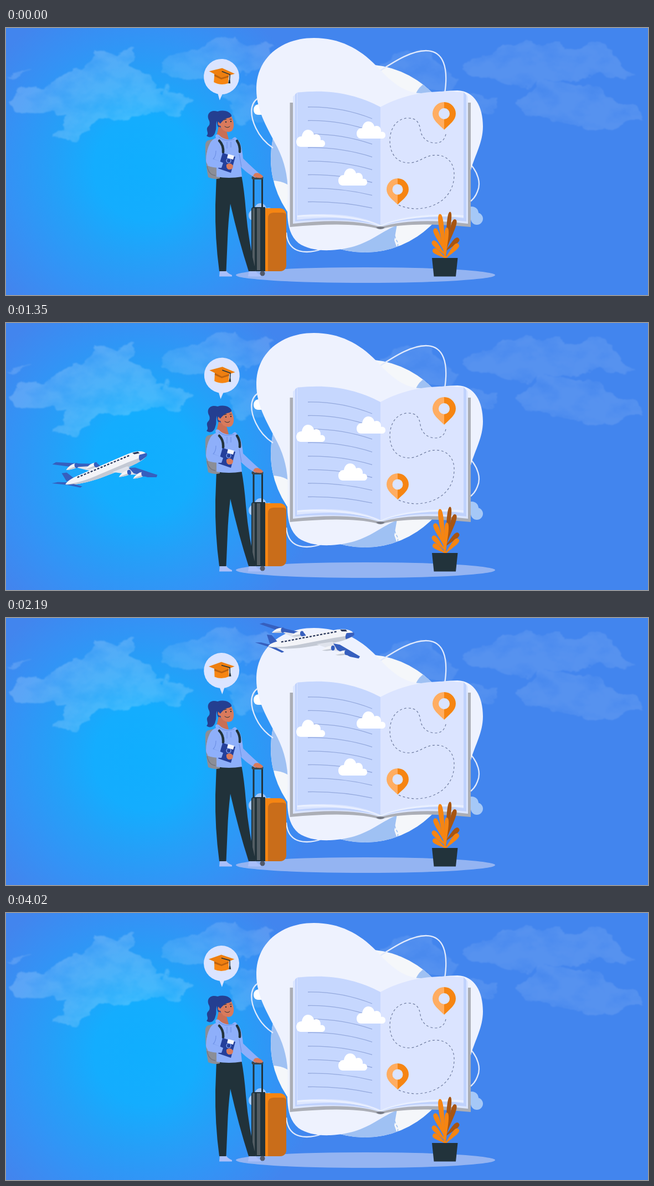
These frames come from a looping animation (1159 by 483 pixels, 4.35 s). An HTML page:

```html
<!DOCTYPE html>
<html lang="en">
<head>
<meta charset="utf-8">
<title>Study abroad</title>
<style>
html, body { margin: 0; width: 100%; height: 100%; overflow: hidden; background: #4285ee; }
svg { position: absolute; left: 0; top: 0; width: 1159px; height: 483px; }
#sky { will-change: transform; }
</style>
</head>
<body>
<svg id="sky" viewBox="0 0 1159 483">
  <defs>
    <radialGradient id="glow" gradientUnits="userSpaceOnUse" cx="252" cy="254" r="330">
      <stop offset="0" stop-color="#10aefe"/>
      <stop offset=".28" stop-color="#14adfe"/>
      <stop offset=".5" stop-color="#24a0f8"/>
      <stop offset=".75" stop-color="#3492f5"/>
      <stop offset="1" stop-color="#4285ee"/>
    </radialGradient>
    <filter id="wisp" filterUnits="userSpaceOnUse" x="0" y="0" width="1159" height="483" color-interpolation-filters="sRGB">
      <feTurbulence type="fractalNoise" baseFrequency=".022 .032" numOctaves="6" seed="7" result="n"/>
      <feDisplacementMap in="SourceGraphic" in2="n" scale="34" xChannelSelector="R" yChannelSelector="G" result="d"/>
      <feColorMatrix in="n" values="0 0 0 0 1  0 0 0 0 1  0 0 0 0 1  1.3 0 0 0 .2" result="m"/>
      <feComposite in="d" in2="m" operator="in"/>
      <feGaussianBlur stdDeviation=".8"/>
    </filter>
  </defs>
  <rect width="1159" height="483" fill="url(#glow)"/>
  <g filter="url(#wisp)" fill="#fff">
    <path opacity=".19" d="M8 132L32 108 76 104 110 76 150 65 166 40 200 46 232 35 226 65 260 80 268 115 292 110 340 130 320 155 270 150 250 165 200 160 170 165 150 190 120 205 80 198 105 180 110 157 60 155 20 147Z"/>
    <path opacity=".14" d="M275 72L300 50 330 36 380 25 440 28 492 36 480 66 450 84 400 92 350 90 300 92ZM398 112L425 96 456 102 460 165 430 168 405 152Z"/>
    <path opacity=".16" d="M0 84L20 80 38 74 22 92Z"/>
    <path opacity=".1" d="M678 72L700 42 750 38 780 62 818 92 800 120 730 104ZM815 126L892 126 880 148 850 158Z"/>
    <path opacity=".11" d="M820 75L860 42 900 30 1000 27 1020 36 1080 30 1115 60 1132 85 1060 88 1000 96 920 106 880 95Z"/>
    <path opacity=".11" d="M920 130L960 100 1000 98 1060 108 1085 125 1140 135 1152 165 1110 182 1040 180 980 170 940 155Z"/>
  </g>
</svg>

<svg viewBox="0 0 1159 483">
  <defs>
    <path id="cloud" d="M8 31C3 31 0 27 0 22C0 17 3 12 10 12C11 5 15 0 21 0C27 0 31 4 32 9C39 6 45 11 44 19C49 18 52 21 52 25C52 29 49 31 46 31Z"/>
    <clipPath id="globe"><circle cx="648" cy="236" r="170"/></clipPath>
    <g id="pin">
      <path fill="#f68512" d="M0 -21A21 21 0 0 1 21 0C21 12 10 19 0 29Z"/>
      <path fill="#ffad61" d="M0 -21A21 21 0 0 0 -21 0C-21 12 -10 19 0 29Z"/>
      <circle r="10" fill="#dbe4ff"/>
    </g>
  </defs>

  <ellipse cx="649" cy="447" rx="234" ry="14" fill="#94b4f2"/>

  <!-- globe and blob -->
  <g fill="#a5c8f7">
    <use href="#cloud" x="438" y="317"/>
    <circle cx="841" cy="335" r="12"/>
    <circle cx="850" cy="345" r="11"/>
  </g>
  <use href="#cloud" x="447" y="126" fill="#fff"/>
  <g clip-path="url(#globe)">
    <rect x="470" y="60" width="350" height="350" fill="#f5f7fa"/>
    <path fill="#9fc1f3" d="M470 200H520V292Q505 276 478 276ZM740 118Q746 106 756 100L780 96V140H740ZM570 420V380L670 355H706L701 384 706 398 700 420Z"/>
    <path d="M704 360Q699 374 705 384T703 400" fill="none" stroke="#9fc1f3" stroke-width="1.5" stroke-dasharray="5 3"/>
  </g>
  <path fill="none" stroke="#e1eafc" stroke-width="2.3" d="M676 77C705 58 733 41 758 41C790 41 799 72 792 118M455 127C438 138 442 162 451 181C459 198 470 209 482 217M838 246C852 261 858 281 851 296C848 304 843 311 836 315M506 370C508 395 522 405 543 405C554 405 562 403 572 399"/>
  <path fill="#eef2fe" d="M452 108C453 55 496 18 556 18C602 18 638 37 668 68C689 90 715 119 752 118C778 117 794 113 815 113C846 114 861 142 861 178C861 210 844 234 838 262C832 300 800 340 740 348C676 356 666 398 586 402C562 403 542 399 528 389C510 374 507 350 508 318C511 280 506 248 490 216C474 184 451 150 452 108Z"/>

  <!-- book -->
  <path fill="#abaeb6" d="M512.5 135H520V352Q620 342 676 358Q732 342 832 352V135H839V360Q734 350 684 362Q676 366 668 362Q618 350 512.5 360Z"/>
  <path fill="#dce6ff" d="M518 124L527 116Q620 112 676 143Q732 112 826 116L834 124V354Q734 342 676 360Q618 342 518 354Z"/>
  <path fill="#c0d2fc" d="M826 116L831 121V350Q734 338 676 359Q734 332 826 344ZM522 120L525 117V347Q620 336 676 358Q618 342 522 350Z"/>
  <path fill="#eaf0ff" d="M526 338Q624 334 676 357Q728 334 826 338V342Q728 337 676 359Q624 337 526 342Z"/>
  <path fill="#c6d7fe" d="M526 117C580 110 632 119 676 143V356C632 336 580 334 526 339Z"/>
  <path fill="#dbe4ff" d="M826 117C772 110 720 119 676 143V356C720 336 772 334 826 339Z"/>
  <path fill="#777b86" d="M668 361Q676 357 684 361Q676 367 668 361Z"/>
  <g id="rows" fill="none" stroke="#94a9dd" stroke-width="1.3"></g>
  <path fill="none" stroke="#6d7a9f" stroke-width="1.2" stroke-dasharray="4 4" d="M794 192C792 202 786 208 775 208C760 208 750 198 748 184C746 170 740 163 726 163C705 163 693 182 693 204C693 228 706 244 727 244C747 244 755 230 776 230C798 230 810 246 809 267C808 306 776 327 738 327Q722 326 708 320"/>
  <use href="#pin" x="791" y="155"/>
  <use href="#pin" transform="translate(707 292) scale(.95)"/>
  <g fill="#fff">
    <use href="#cloud" x="524" y="184"/>
    <use href="#cloud" x="633" y="169"/>
    <use href="#cloud" x="600" y="254"/>
  </g>

  <!-- plant -->
  <g id="leaves"></g>
  <path fill="#22333b" d="M769 416H815.5L812 449.500H772.5Z"/>

  <!-- plane -->
  <g id="plane">
    <g fill="#365fbe">
      <path d="M-92 -20L-85 -23 -40 -15 -10 -11 -4 -4 -30 -4Z"/>
      <path d="M-77 -2L-68 -2 -54 12 -70 14Z"/>
      <path d="M-97 14L-86 13 -60 17 -62 22Z"/>
    </g>
    <path fill="#dfe3ec" d="M-52 -10L-20 -8 -4 0 -18 3Z"/>
    <path fill="#f3f4f8" d="M-73 19Q-68 11 -46 5L38 -20Q64 -28 75 -22Q83 -17 76 -12Q64 -4 40 3L-8 15Q-50 24 -73 19Z"/>
    <path fill="#c3c9d4" d="M-73 19Q-46 20 -8 8L44 -7Q64 -12 79 -16Q76 -7 40 3L-8 15Q-50 24 -73 19Z"/>
    <path fill="#365fbe" d="M66 -18Q74 -19 79 -20Q82 -15 76 -12Q71 -9 66 -7Q63 -11 66 -18Z"/>
    <path fill="none" stroke="#28365a" stroke-width="2.3" stroke-dasharray="4 2.500" d="M-50 9L48 -19"/>
    <path fill="#28365a" d="M54 -23L64 -24 67 -21 57 -20Z"/>
    <path fill="#365fbe" d="M-70 20L-58 20 -43 26 -47 28Z"/>
    <path fill="#dfe3ec" d="M14 7L42 0 70 18 48 16Z"/>
    <path fill="#365fbe" d="M44 3L56 4 94 22 92 26 76 24 52 14Z"/>
    <g id="engines"></g>
  </g>

  <!-- suitcase -->
  <path fill="none" stroke="#22333b" stroke-width="3" d="M447 326V270M462.500 326V270"/>
  <rect x="443.5" y="268" width="21" height="6" rx="3" fill="#3c464c"/>
  <rect x="456" y="326" width="50" height="114" rx="12" fill="#f68512"/>
  <path fill="#c96d1a" d="M473 440V344Q473 334 483 334H500Q506 334 506 340V428Q506 440 494 440Z"/>
  <path fill="#22333b" d="M447 324H468V440H447Q443 440 443 436V328Q443 324 447 324Z"/>
  <path fill="#535d63" d="M445 326H449V438H445ZM453 326H459V438H453Z"/>
  <circle cx="463" cy="444" r="4.500" fill="#51596a"/>

  <!-- traveller -->
  <path fill="#a9bffa" d="M386 438H397Q400 444 408 447V449.500H385ZM439 438H450Q452 444 460 447V449.500H437Z"/>
  <path fill="#21323a" d="M380 266H425Q430 292 433 330Q438 390 451 440H438Q420 384 405 318Q401 352 400 382L397.500 440H385Q377 380 378 320Z"/>
  <path fill="#8b8e97" d="M366 203Q378 199 386 203V272Q376 275 365 270Q359 240 360 210Q361 204 366 203Z"/>
  <path fill="none" stroke="#70747f" stroke-width="1.3" d="M362 224H376M363 250Q366 266 378 267"/>
  <path fill="#243f91" d="M367 168C360 155 370 147 382 151C394 147 408 152 407 161L404 164 385 182Q380 176 381 168C378 174 381 180 378 187C376 197 368 200 362 195C368 190 359 184 365 178Q369 174 367 168Z"/>
  <path fill="#c96f55" d="M384 178L398 186 402 201 390 206 380 196Z"/>
  <path fill="#d97a5c" d="M388 163Q396 165 407 160Q412 170 411 178Q410 188 401 188Q390 187 387 177Q381 177 383 170Q385 167 388 172Z"/>
  <path fill="#243f91" d="M382 162Q390 149 407 157Q408 162 399 163Q392 166 387 173Q382 170 382 162Z"/>
  <circle cx="397" cy="170" r="1.200" fill="#22333b"/>
  <circle cx="406" cy="169" r="1.200" fill="#22333b"/>
  <path fill="none" stroke="#22333b" stroke-width="1" stroke-linecap="round" d="M394 166L398 165M404 165L407 165M395 178Q400 182 404 178"/>
  <path fill="#8eaffa" d="M379 199Q376 191 384 193Q394 204 408 201Q414 194 417 201Q425 205 428 236Q442 250 457 263L450 271Q434 262 424 251L426 269Q402 273 380 269L380 250Q362 252 361 240Q361 222 369 207Q373 201 379 199Z"/>
  <path fill="none" stroke="#6f92e6" stroke-width="1.2" d="M384 197Q396 207 412 201M379 222Q379 232 374 237L391 244M421 228L425 251M399 206V218M406 206V216"/>
  <path fill="none" stroke="#22333b" stroke-width="4.500" stroke-linecap="round" d="M385 204Q393 212 392 225M417 204Q423 213 422 224"/>
  <path fill="#243f9a" d="M391 226L414 233 406 262 383 254Z"/>
  <path fill="#f5f7fd" d="M401 228L412 231 410 238 399 235Z"/>
  <circle cx="402" cy="240" r="4" fill="none" stroke="#8eaffa" stroke-width="1.2"/>
  <path fill="#8eaffa" d="M362 236Q374 235 392 244L389 253Q372 253 364 249Z"/>
  <path fill="#d97a5c" d="M398 247Q405 242 410 249Q410 257 402 256Q397 254 398 247ZM449 263Q456 260 464 268Q464 272 456 271Q449 271 446 267Z"/>

  <!-- thought bubble -->
  <g id="bubble">
    <path fill="#dbe4ff" d="M-5 29H5L0 43Z"/>
    <circle r="32" fill="#dbe4ff"/>
    <path fill="#f68512" d="M-13 -5H13V11Q0 17 -13 11Z"/>
    <path fill="#bd620f" d="M-13 -4L0 1 13 -4V0L0 5 -13 0Z"/>
    <path fill="#ee7f10" d="M-23 -8L0 -15.500 23.500 -7 0 2Z"/>
    <path fill="none" stroke="#22333b" stroke-width="1.5" d="M0 -9.500L15 -5V6"/>
    <path fill="#22333b" d="M14 5H16L17 11H13Z"/>
  </g>
</svg>

<script>
const $ = id => document.getElementById(id);
const LOOP = 4350, STEP = 30;

// ruled lines get flatter towards the foot of the page
$('rows').innerHTML = Array.from({ length: 8 }, (_, i) => {
  const y = 143 + i * 24.5, drop = 21 - i * 1.4;
  return `<path d="M545 ${y}Q605 ${y - 1} 661 ${y + drop}"/>`;
}).join('');

// leaf: base x, base y, length, width, lean, colour
const leaf = ([x, y, len, w, lean, fill]) =>
  `<path fill="${fill}" transform="translate(${x} ${y}) rotate(${lean})" ` +
  `d="M-1 0C${-w * .3} ${-len * .4} ${-w * 1.5} ${-len} 0 ${-len}S${w * .3} ${-len * .4} 1 0Z"/>`;
const ORANGE = '#f68512', BROWN = '#a85511';
$('leaves').innerHTML = [
  [793, 416, 84, 5, 6, BROWN], [796, 396, 52, 6, 17, BROWN], [795, 402, 31, 6, 46, BROWN],
  [793, 416, 80, 6, -7, ORANGE], [791, 402, 43, 6, -24, ORANGE], [792, 410, 33, 6, -42, ORANGE],
  [793, 416, 27, 6, -55, ORANGE], [794, 416, 34, 6, 42, ORANGE], [793, 417, 56, 5, 3, ORANGE]
].map(leaf).join('');

const engine = ([x, y]) =>
  `<g transform="translate(${x} ${y}) rotate(-6)">` +
  '<path fill="#f3f4f8" d="M-13 4Q-4 -5 7 -4V4Q-4 6 -13 4Z"/>' +
  '<path fill="#c3c9d4" d="M-13 4Q-4 2 7 1V4Q-4 6 -13 4Z"/>' +
  '<ellipse cx="7" rx="3.400" ry="4.600" fill="#365fbe"/></g>';
$('engines').innerHTML = [[-56, -12], [-21, -9], [37, 12], [62, 18]].map(engine).join('');

// keys: time, x, y, turn
const planeKeys = [
  [390, -80, 545, -30], [900, 40, 410, -19.5], [1110, 99.7, 346.7, -14.3],
  [1590, 262, 183, 0], [1890, 396.7, 96.5, 5.3], [1980, 441, 75, 5.4],
  [2490, 696.5, -2, 5], [3060, 954, -19, 5], [3330, 1047.5, -24, 5],
  [3600, 1125, -29, 5], [4020, 1260, -45, 5]
];
const bubbleKeys = [
  [390, 389, 88, 4.4], [1110, 389.5, 93, 3.5], [1590, 390, 96, 2.5],
  [1890, 389.5, 96, 0], [2490, 389, 94, -2.5], [3330, 389, 91, -1.2], [4020, 389, 91, -1.2]
];

// smooth curve through the keys, held at both ends
function pose(keys, t) {
  const last = keys.length - 1;
  if (t <= keys[0][0]) return keys[0].slice(1);
  if (t >= keys[last][0]) return keys[last].slice(1);
  const i = keys.findIndex(k => k[0] > t) - 1;
  const a = keys[i], b = keys[i + 1], p = keys[Math.max(i - 1, 0)], n = keys[Math.min(i + 2, last)];
  const d = b[0] - a[0], u = (t - a[0]) / d, v = 1 - u;
  return [1, 2, 3].map(c => {
    const ma = (b[c] - p[c]) / (b[0] - p[0]) * d;
    const mb = (n[c] - a[c]) / (n[0] - a[0]) * d;
    return a[c] * (1 + 2 * u) * v * v + ma * u * v * v + b[c] * u * u * (3 - 2 * u) - mb * u * u * v;
  });
}

function place(id, keys, t) {
  const [x, y, turn] = pose(keys, t);
  $(id).setAttribute('transform', `translate(${x.toFixed(2)} ${y.toFixed(2)}) rotate(${turn.toFixed(2)})`);
}

const start = performance.now();
function draw() {
  const t = Math.floor((performance.now() - start) % LOOP / STEP) * STEP;
  place('plane', planeKeys, t);
  place('bubble', bubbleKeys, t);
  requestAnimationFrame(draw);
}
draw();
</script>
</body>
</html>
```
